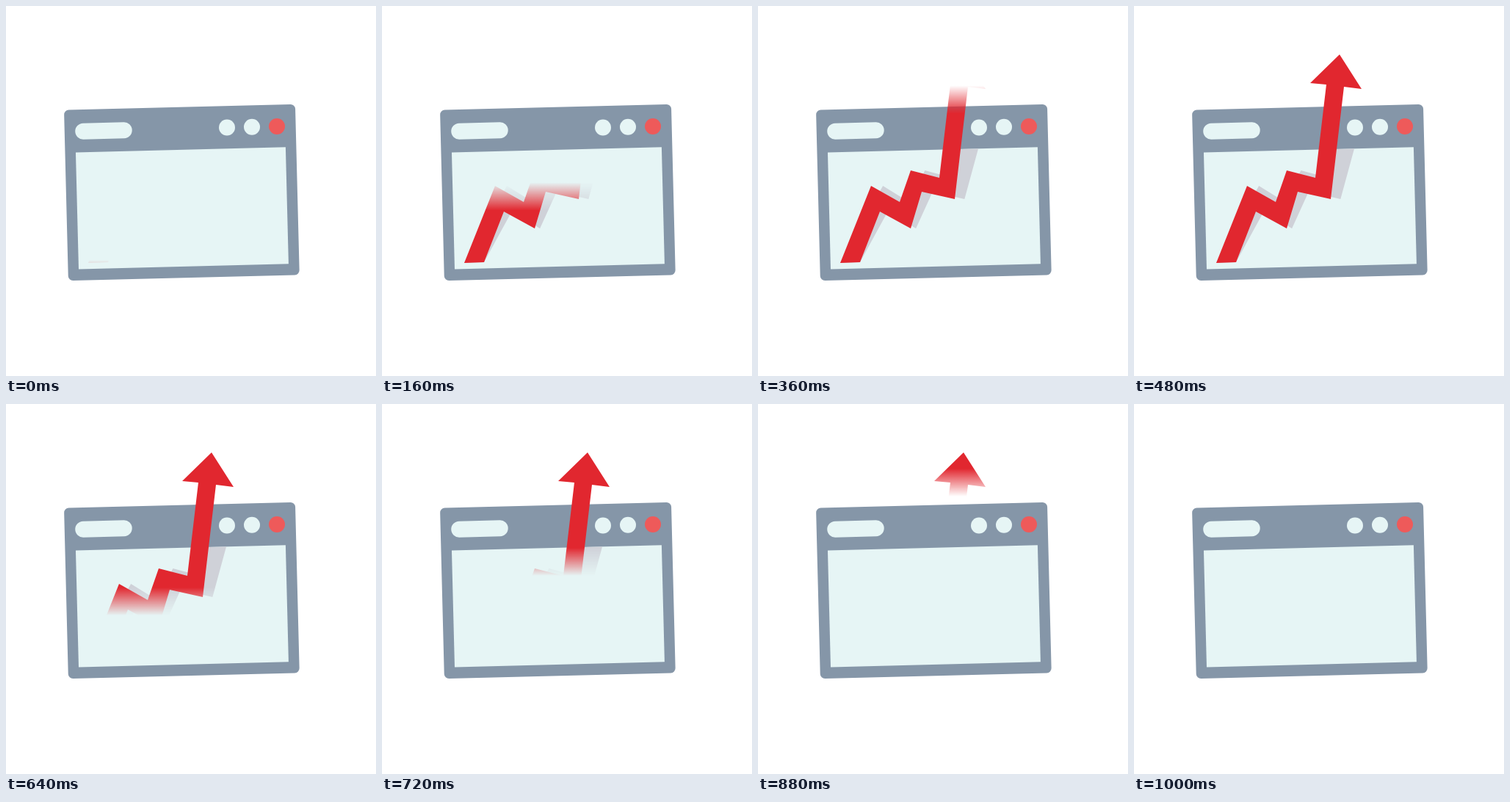
Write an HTML page that moves like this. It is 504 px wide and 504 px high and loops after 1.04 s.

```html
<!DOCTYPE html>
<html lang="en">
<head>
<meta charset="utf-8">
<title>Rising arrow</title>
<style>
  html, body { margin: 0; width: 100%; height: 100%; overflow: hidden; background: #fff; }
  svg { display: block; width: 100vw; height: 100vh; }
</style>
</head>
<body>
<svg viewBox="0 0 504 504">
  <defs>
    <linearGradient id="fade" gradientUnits="userSpaceOnUse" x1="0" x2="0" y1="346" y2="384">
      <stop offset="0" stop-color="#fff" stop-opacity="0"/>
      <stop offset="1" stop-color="#fff"/>
    </linearGradient>
    <mask id="wipe" maskUnits="userSpaceOnUse" x="0" y="0" width="504" height="504">
      <rect width="504" height="504" fill="url(#fade)"/>
    </mask>
    <clipPath id="pane">
      <rect x="-143" y="-58.2" width="286" height="159" transform="translate(239.4 254) rotate(-1.45)"/>
    </clipPath>
    <path id="arrow" d="M112 350 154 245 193 267 208 224 247 234 262 107 240 105 280 66 310 113 286 110 268 263 223 253 208 303 166 280 139 349Z"/>
  </defs>

  <g transform="translate(239.4 254) rotate(-1.45)" fill="#e6f5f5">
    <rect x="-157.5" y="-116.3" width="315" height="232.6" rx="6.5" fill="#8596a8"/>
    <rect x="-143" y="-58.2" width="286" height="159"/>
    <rect x="-143" y="-97.7" width="77.5" height="22" rx="11"/>
  </g>
  <g fill="#e6f5f5">
    <circle cx="301" cy="165.5" r="11"/>
    <circle cx="335" cy="164.7" r="11"/>
    <circle cx="369" cy="164" r="11" fill="#ee5a5a"/>
  </g>

  <g mask="url(#wipe)">
    <g clip-path="url(#pane)">
      <!-- the shadow leans away from the foot of the arrow -->
      <use href="#arrow" fill="#cfd1d8" transform="matrix(1 0 -.155 1 54.1 0)"/>
    </g>
    <use href="#arrow" fill="#e1272f"/>
  </g>
</svg>
<script>
  const LOOP = 1040, STEP = 40, SOFT = 38;
  const fade = document.getElementById('fade');

  // clear: where the arrow is fully hidden; solid: where it is fully shown
  function setEdge(clear, solid) {
    fade.setAttribute('y1', clear);
    fade.setAttribute('y2', solid);
  }

  function draw(now) {
    const t = Math.floor(now % LOOP / STEP) * STEP;
    if (t < LOOP / 2) {
      const top = 346 - 0.66 * t;
      setEdge(top, top + SOFT);
    } else {
      const bottom = 720 - 0.675 * t;
      setEdge(bottom, bottom - SOFT);
    }
    requestAnimationFrame(draw);
  }
  draw(performance.now());
</script>
</body>
</html>
```
